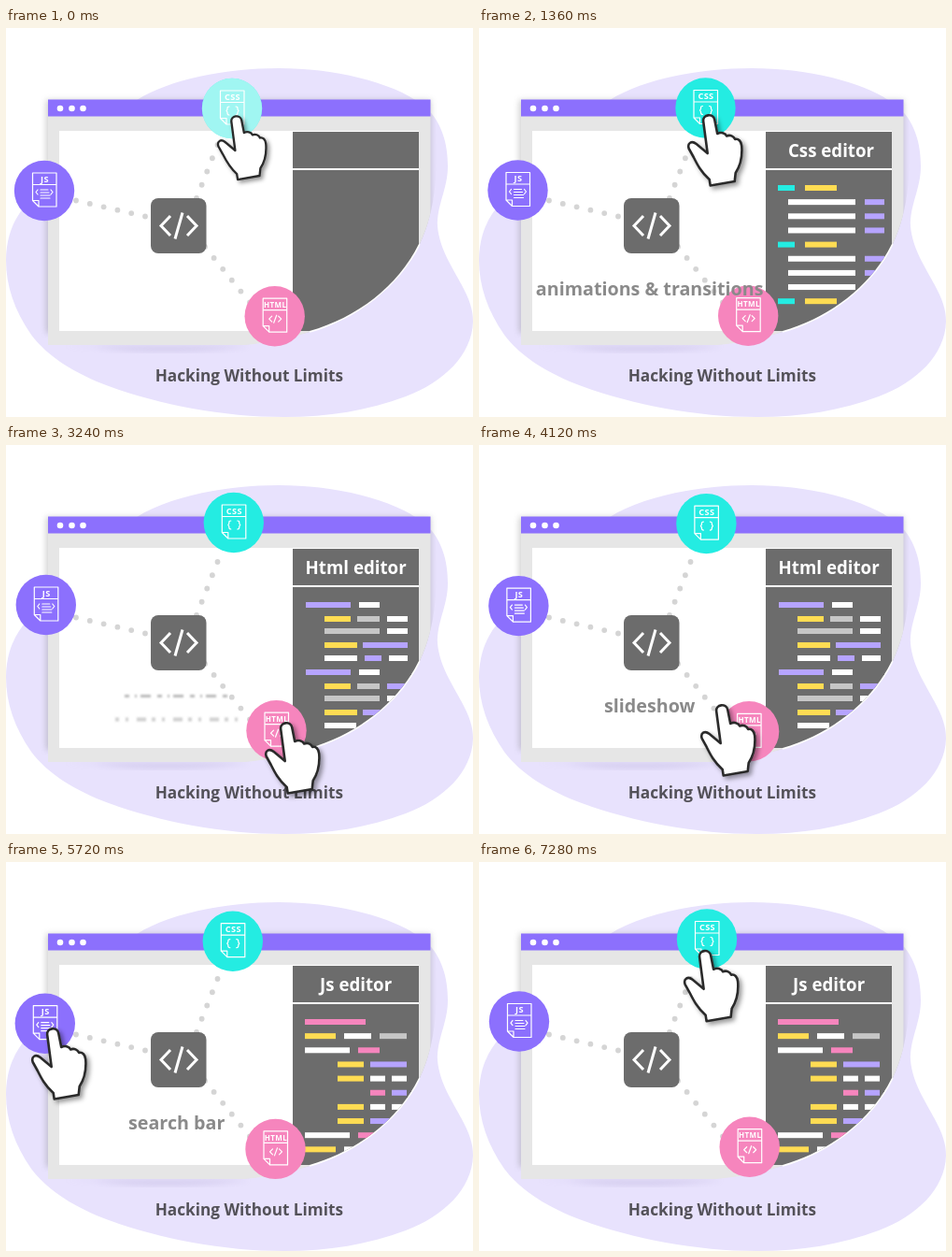
An HTML page that plays this animation: 500x416 px, repeating every 7320 ms.

```html
<!DOCTYPE html>
<html lang="en">
<head>
<meta charset="utf-8">
<title>Hacking Without Limits</title>
<style>
  html, body { margin: 0; width: 100%; height: 100%; overflow: hidden; background: #fff; }
  svg { display: block; width: 100vw; height: 100vh; }
  text { font-family: "Open Sans", "Noto Sans", sans-serif; font-weight: 700; text-anchor: middle; }
  .icon { fill: none; stroke: #fff; stroke-width: 1.2; stroke-linejoin: round; stroke-linecap: round; }
  .icon text { fill: #fff; stroke: none; letter-spacing: .4px; }
</style>
</head>
<body>
<svg viewBox="0 0 500 416" xmlns="http://www.w3.org/2000/svg">
  <defs>
    <filter id="soft" x="-20%" y="-20%" width="140%" height="140%"><feGaussianBlur stdDeviation="3"/></filter>
    <filter id="smear" x="-10%" y="-30%" width="120%" height="160%"><feGaussianBlur stdDeviation=".8"/></filter>
    <filter id="handShadow" x="-40%" y="-40%" width="180%" height="180%">
      <feDropShadow dx="3" dy="3" stdDeviation="2.5" flood-color="#000" flood-opacity=".4"/>
    </filter>
    <clipPath id="cut">
      <path d="M0 0H500V100H460C463 150 461 193 443 231C421 276 376 311 325 325C293 335 260 340 225 341H0Z"/>
    </clipPath>
    <clipPath id="panelCut">
      <path d="M307 111H442V231C420 276 375 310 325 324H307Z"/>
    </clipPath>
  </defs>

  <path fill="#e8e2fd" d="M140 77C175 55 235 43 292 43C350 43 412 57 446 82C467 99 473 124 473 148C473 172 461 190 462 212C464 236 478 256 488 275C496 290 500 301 500 314C499 350 468 379 428 394C388 409 345 416 298 416C232 416 165 403 110 383C75 370 45 352 27 328C9 302 0 276 0 248C1 209 18 188 45 168Z"/>

  <g clip-path="url(#cut)">
    <rect x="43" y="77" width="412" height="249" fill="#777" opacity=".35" filter="url(#soft)"/>
  </g>
  <path d="M60 340H260C225 346 145 349 95 341Z" fill="#9d93c4" opacity=".3" filter="url(#soft)"/>
  <g clip-path="url(#cut)">
    <rect x="45" y="77" width="409.500" height="262" fill="#e6e6e6"/>
    <rect x="45" y="76.500" width="409.500" height="18" fill="#8c70fd"/>
    <g fill="#fff">
      <circle cx="58" cy="86" r="3.3"/><circle cx="70.5" cy="86" r="3.3"/><circle cx="82.5" cy="86" r="3.3"/>
      <rect x="57" y="110" width="385" height="214"/>
    </g>
  </g>
  <path d="M442.500 231C420 276 375 310 325 324.500" fill="none" stroke="#fff" stroke-width="2.500"/>
  <g clip-path="url(#panelCut)">
    <rect x="307" y="111" width="135" height="213" fill="#6c6c6c"/>
    <rect x="307" y="150" width="135" height="2" fill="#fff"/>
    <g id="panels"></g>
  </g>

  <g id="dots" fill="#d5d5d5"></g>
  <rect x="155" y="182" width="59.5" height="59" rx="8" fill="#6c6c6c"/>
  <path d="M176 201L166 211.500L176 222M189 197.500L181 225.500M194 201L204 211.500L194 222" fill="none" stroke="#fff" stroke-width="3"/>

  <text x="260.300" y="378" font-size="17.200" fill="#535158">Hacking Without Limits</text>

  <g id="badges"></g>
  <g id="words" fill="#8a8a8a" font-size="19.700"></g>
  <g id="strips" fill="none" stroke="#777" filter="url(#smear)">
    <path d="M127 268.500H240" stroke-width="3" stroke-dasharray="5 6 2 4 11 7" opacity=".5"/>
    <path d="M117 293.500H248" stroke-width="4" stroke-dasharray="4 7 3 9 10 6" opacity=".35"/>
  </g>

  <g id="hand">
    <g filter="url(#handShadow)">
      <path fill="#fff" stroke="#2c2c2c" stroke-width="2.600" stroke-linejoin="round"
        d="M-5.500 8C-6.500 0 5 -1 6.500 6L9.500 21C13 19 18 20 19.500 23.500C23 22 27 23.500 28.500 27C32 26 35 29 35.500 34C36.500 46 35 54 29 63L28 72L2 76.500L1 70C-8 62 -12 54 -16 46L-21 37C-23 31 -18 28 -13 32L-1 42Z"/>
    </g>
  </g>
</svg>

<script>
const LOOP = 7320, STEP = 40;
const NS = "http://www.w3.org/2000/svg";
const $ = id => document.getElementById(id);

function add(parent, tag, attrs = {}, text) {
  const el = document.createElementNS(NS, tag);
  for (const key in attrs) el.setAttribute(key, attrs[key]);
  if (text) el.textContent = text;
  return parent.appendChild(el);
}

const clamp = v => Math.max(0, Math.min(1, v));
const ramp = (t, from, to) => clamp((t - from) / (to - from));
const easeInOut = u => u < .5 ? 2 * u * u : 1 - 2 * (1 - u) ** 2;
const smooth = u => u * u * (3 - 2 * u);

const COLORS = { c: "#24ece2", y: "#ffdc53", w: "#fff", l: "#b6a4ff", g: "#c6c6c6", p: "#f685bd" };

// Each bar is colour, left and right edge.
const cssHead = "c320-338 y349-383", cssRule = "w331-403 l413-434";
const htmlSteps = [0, 15, 28, 43, 57];
const evenRows = i => i * 15.15;
const editors = [
  { title: "Css editor", x: 377, start: 0, end: 2500, rowY: evenRows, rows: [
    cssHead, cssRule, cssRule, cssRule, cssHead, cssRule, cssRule, cssRule, cssHead] },
  { title: "Html editor", x: 374.6, start: 2500, end: 4950,
    rowY: i => 72 * Math.floor(i / 5) + htmlSteps[i % 5], rows: [
    "l321-369 w378-400", "y341-369 g376-400 w408-430", "g341-400 w408-430",
    "y341-376 l382-430", "w341-376 l384-402 w410-430",
    "l321-369 w378-400", "y341-369 g376-400 l408-430", "g341-400 w408-430",
    "y341-376 l382-430", "w341-375 l384-402"] },
  { title: "Js editor", x: 374.6, start: 4950, end: LOOP, rowY: evenRows, rows: [
    "p320-385", "y320-353 w362-391 g400-429", "w320-368 p377-400",
    "y355-383 l390-429", "y355-383 w390-406 w413-429", "p390-406 l413-429",
    "y355-383 w390-406 w413-429", "y355-383 l390-429", "w320-368 p377-400",
    "y320-353 w362-391"] }
];

for (const ed of editors) {
  ed.group = add($("panels"), "g");
  ed.label = add(ed.group, "text", { x: ed.x, y: 138, "font-size": 18.7, fill: "#fff" }, ed.title);
  ed.lines = ed.rows.map((row, i) => {
    const line = add(ed.group, "g");
    for (const bar of row.split(" ")) {
      const [left, right] = bar.slice(1).split("-").map(Number);
      add(line, "rect", { x: left, y: 168 + ed.rowY(i), width: right - left, height: 6, fill: COLORS[bar[0]] });
    }
    return line;
  });
}

function dotLine(x1, y1, x2, y2, count) {
  for (let i = 0; i < count; i++) {
    const u = i / (count - 1);
    add($("dots"), "circle", { cx: x1 + (x2 - x1) * u, cy: y1 + (y2 - y1) * u, r: 2.9 });
  }
}
dotLine(75, 184.5, 149, 201.5, 6);
dotLine(204, 182, 226.5, 125, 5);
dotLine(213, 234, 261, 293.5, 6);

const badges = [
  { name: "CSS", x: 243, y: 84.5, color: "#24ece2", click: 0,
    art: "M-3 -2Q-5 -2 -5 0V1L-6 2.500L-5 4V5Q-5 7 -3 7M4 -2Q6 -2 6 0V1L7 2.500L6 4V5Q6 7 4 7" },
  { name: "HTML", x: 288.7, y: 306.7, color: "#f685bd", click: 2500,
    art: "M-3 0L-6 3L-3 6M4 0L7 3L4 6M2 -1L-1 7" },
  { name: "JS", x: 42, y: 172.5, color: "#8c70fd", click: 4950,
    art: "M-7 -1L-9 1.500L-7 4M7 -1L9 1.500L7 4M-4 -1H4M-4 2H5M-4 5H6M-4 8H6" }
];

for (const b of badges) {
  b.group = add($("badges"), "g");
  add(b.group, "circle", { r: 32.2, fill: b.color });
  const icon = add(b.group, "g", { class: "icon" });
  add(icon, "path", { d: "M-12.5 -19H13V17H-6L-12.5 10.500ZM-12.5 -6.500H13M-12.5 10.500H-6V17" });
  add(icon, "path", { d: b.art });
  add(icon, "text", { x: .5, y: -9.3, "font-size": b.name === "HTML" ? 8 : 9.2 }, b.name);
  b.flash = add(b.group, "circle", { r: 32.2, fill: "#fff" });
}

const words = [
  ["animations & transitions", 700, 1520],
  ["loader", 1680, 2440],
  ["slideshow", 3320, 4870],
  ["search bar", 5480, 6900]
].map(([text, start, end]) => ({
  start, end, el: add($("words"), "text", { x: 182.7, y: 285.5 }, text)
}));

// Time, x and y of the shared drift of the badges.
const drift = [
  [0, -1, 1.5], [1360, -.5, 1], [2200, 1, -1.5], [3240, .8, -1.5], [3750, -.3, -.8],
  [4720, 1.8, .4], [5720, -.2, .2], [6500, -.4, -.9], [LOOP, 1, -2]
];

function driftAt(t) {
  const i = drift.findIndex(k => k[0] > t);
  const a = drift[i - 1], b = drift[i];
  const u = smooth(ramp(t, a[0], b[0]));
  return [a[1] + (b[1] - a[1]) * u, a[2] + (b[2] - a[2]) * u];
}

const moves = [
  { start: 1500, end: 2350, dx: 54, dy: 204 },
  { start: 3840, end: 4830, dx: -250, dy: -119 },
  { start: 6400, end: 7380, dx: 196, dy: -85 }
];

function handAt(t) {
  let x = 245.7, y = 92;
  for (const m of moves) {
    const u = easeInOut(ramp(t, m.start, m.end));
    x += m.dx * u;
    y += m.dy * u;
  }
  return [x, y];
}

function pressAt(t, click) {
  const since = t - click;
  return since < 0 ? 0 : 1 - smooth(ramp(since, 40, 320));
}

function draw(t) {
  for (const ed of editors) {
    const since = t - ed.start;
    ed.group.style.display = since >= 0 && t < ed.end ? "" : "none";
    ed.label.style.opacity = ramp(since, 80, 280);
    ed.lines.forEach((line, i) => line.style.opacity = ramp(since, 160 + i * 45, 280 + i * 45));
  }

  const [dx, dy] = driftAt(t);
  let press = 0;
  for (const b of badges) {
    const p = pressAt(t, b.click);
    press = Math.max(press, p);
    b.group.setAttribute("transform", `translate(${b.x + dx} ${b.y + dy})`);
    b.flash.style.opacity = .57 * p;
  }

  for (const w of words)
    w.el.style.opacity = Math.min(ramp(t, w.start, w.start + 160), 1 - ramp(t, w.end - 80, w.end + 80));
  $("strips").style.opacity = Math.min(ramp(t, 3120, 3220), 1 - ramp(t, 3260, 3360));

  const [x, y] = handAt(t);
  const scale = 1 - .1 * press;
  $("hand").setAttribute("transform", `translate(${x + .6 * press} ${y + 1.2 * press}) scale(${scale})`);
}

const began = performance.now();
function tick() {
  const t = (performance.now() - began) % LOOP;
  draw(Math.floor(t / STEP) * STEP);
  requestAnimationFrame(tick);
}
draw(0);
requestAnimationFrame(tick);
</script>
</body>
</html>
```
